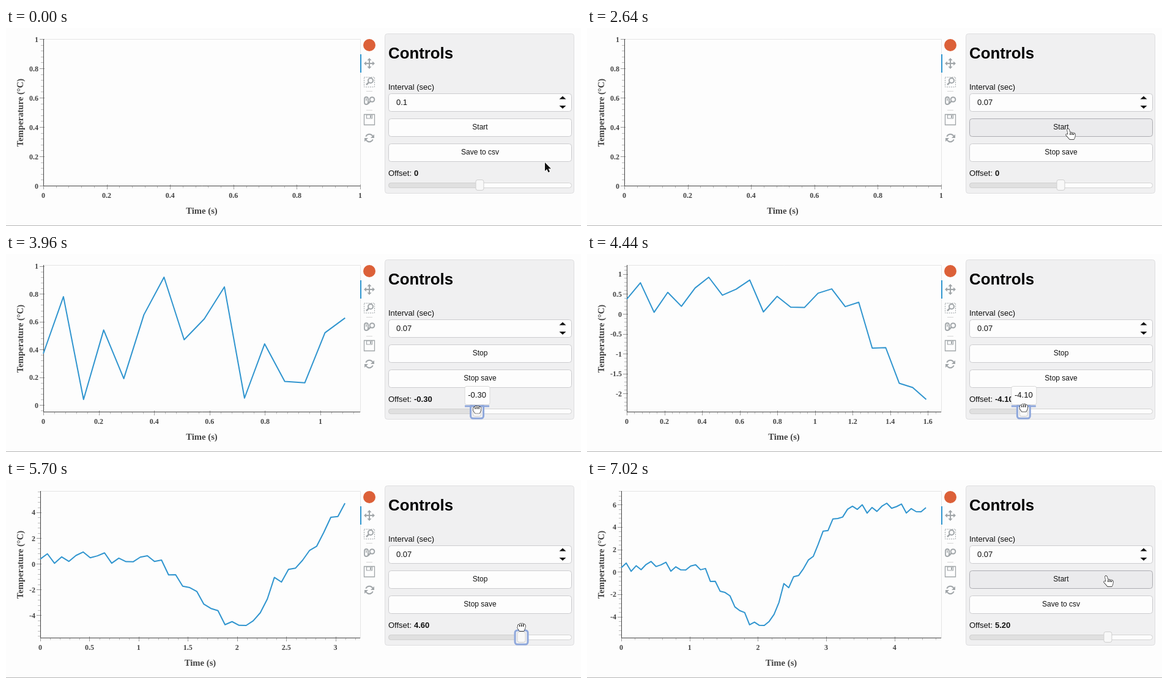
An HTML page with a canvas that plays this animation: 940x324 px, repeating every 7.05 s.

```html
<!DOCTYPE html>
<html>
<head>
<meta charset="utf-8">
<style>
html, body { margin: 0; width: 940px; height: 324px; overflow: hidden; background: #fdfdfd; }
canvas { display: block; }
</style>
</head>
<body>
<canvas id="stage" width="940" height="324"></canvas>
<script>
const c = document.getElementById('stage').getContext('2d');
const LOOP = 7050;
const SANS = '"Liberation Sans", Arial, sans-serif';
const SERIF = '"Liberation Serif", Times, serif';
const PAGE = '#fdfdfd', PANEL = '#f0f0f1', EDGE = '#cccccf', ICON = '#a1a6a9';
const INK = '#444', BLUE = '#3095cf', GLOW = '#8fa8dc';
const TOP = 18, BOTTOM = 258, RIGHT = 579;

// Moments of the interaction, in ms
const FIRST_STEP = 600, STEP_GAP = 240, SAVE = 1950, START = 3005;
const GRAB = 3600, DRAG = 3840, DROP = 6000, STOP = 6895;
const SAMPLE = 62.5, LAG = 70;

// [time, offset]
const offsetKeys = [
  [DRAG, 0], [4650, -4.95], [4820, -4.95], [5040, -1.5], [5200, -.5], [5700, 4.6], [5860, 5.2]
];
// [time, x, y]; while dragging, x follows the slider handle
const cursorKeys = [
  [150, 881, 220], [500, 909, 128], [1300, 909, 128], [1800, 797, 203], [2050, 797, 203],
  [2350, 786, 165], [3080, 786, 165], [3450, 774, 253], [3800, 774, 253],
  [5040, 752, 247], [5700, 843, 239], [DROP, 851, 240], [6350, 848, 157]
];

const smooth = x => x * x * (3 - 2 * x);
function track(keys, t, k) {
  const j = keys.findIndex(key => key[0] > t);
  if (j < 0) return keys[keys.length - 1][k];
  if (j === 0) return keys[0][k];
  const [a, b] = [keys[j - 1], keys[j]];
  return a[k] + (b[k] - a[k]) * smooth((t - a[0]) / (b[0] - a[0]));
}
const offsetAt = t => track(offsetKeys, t, 1);
const sliderX = v => 774.5 + 14.8 * v;

// The sensor: repeating noise lifted by the offset
const noise = [.37, .78, .04, .54, .19, .65, .92, .47, .62, .85, .05, .44, .17, .16, .52, .65];
const sampleTime = i => i * .0717 + .0135 * Math.min(1, i / 15);
const reading = i => noise[i % noise.length] + offsetAt(START + i * SAMPLE - LAG);

function text(s, x, y, font, color = '#111', align = 'left') {
  c.font = font;
  c.fillStyle = color;
  c.textAlign = align;
  c.fillText(s, x, y);
}
function paint(fill, stroke, width) {
  if (fill) { c.fillStyle = fill; c.fill(); }
  if (stroke) { c.strokeStyle = stroke; c.lineWidth = width; c.stroke(); }
}
function box(x, y, w, h, r, fill, stroke, width = 1) {
  c.beginPath();
  c.roundRect(x, y, w, h, r);
  paint(fill, stroke, width);
}
function line(points, color, width = 1) {
  c.beginPath();
  points.forEach(([x, y]) => c.lineTo(x, y));
  paint(null, color, width);
}
function poly(points, fill) {
  c.beginPath();
  points.forEach(([x, y]) => c.lineTo(x, y));
  paint(fill);
}
function ring(x, y, r, color, width, from = 0, to = 7) {
  c.beginPath();
  c.arc(x, y, r, from, to);
  paint(null, color, width);
}
function turned(x, y, angle, fn) {
  c.save();
  c.translate(x, y);
  c.rotate(angle);
  fn();
  c.restore();
}

// About six major steps of 1, 2 or 5, each with five minor ones
function ticks(lo, hi) {
  const span = hi - lo, base = 10 ** Math.floor(Math.log10(span / 6));
  const miss = s => Math.abs(6 - span / s);
  const step = [1, 2, 5, 10].map(m => m * base).reduce((a, b) => miss(b) < miss(a) ? b : a);
  const list = [], minor = step / 5;
  for (let k = Math.ceil(lo / minor - 1e-6); k <= hi / minor + 1e-6; k++)
    list.push({ v: k * minor, label: k % 5 ? '' : String(+(k * minor).toFixed(3)) });
  return list;
}

function chart(t) {
  const count = t < START ? 0 : Math.floor((Math.min(t, STOP) - START) / SAMPLE) + 1;
  const seen = Array.from({ length: count }, (_, i) => reading(i));
  let x1 = 1, y0 = 0, y1 = 1;
  if (count) {
    const lo = Math.min(...seen), hi = Math.max(...seen), pad = (hi - lo) * .1 || 1;
    x1 = sampleTime(count - 1) * 1.05 || 1;
    y0 = lo - pad;
    y1 = hi + pad;
  }
  const xt = ticks(0, x1), yt = ticks(y0, y1);
  const tickFont = 'bold 12px ' + SERIF, titleFont = 'bold 14.67px ' + SERIF;
  c.font = tickFont;
  const left = Math.round(46 + Math.max(...yt.map(k => c.measureText(k.label).width)));
  const px = v => left + v / x1 * (RIGHT - left);
  const py = v => BOTTOM - (v - y0) / (y1 - y0) * (BOTTOM - TOP);
  const snap = v => Math.round(v) + .5;
  const tickColor = label => label ? '#999' : '#bbb';

  box(left + .5, TOP + .5, RIGHT - left, BOTTOM - TOP, 0, null, '#e5e5e5');
  xt.forEach(({ v, label }) => {
    const x = snap(px(v));
    line([[x, BOTTOM - (label ? 2 : 0)], [x, BOTTOM + (label ? 6 : 4)]], tickColor(label));
    text(label, px(v), 278, tickFont, INK, 'center');
  });
  yt.forEach(({ v, label }) => {
    const y = snap(py(v));
    line([[left + (label ? 2 : 0), y], [left - (label ? 6 : 4), y]], tickColor(label));
    text(label, left - 8, py(v) + 4.5, tickFont, INK, 'right');
  });
  line([[left + .5, TOP], [left + .5, BOTTOM + .5], [RIGHT, BOTTOM + .5]], INK);
  c.lineJoin = 'round';
  line(seen.map((v, i) => [px(sampleTime(i)), py(v)]), BLUE, 2);
  c.lineJoin = 'miter';
  text('Time (s)', (left + RIGHT) / 2, 304, titleFont, INK, 'center');
  turned(28, 138.5, -Math.PI / 2, () => text('Temperature (°C)', 0, 0, titleFont, INK, 'center'));
}

function magnifier(x, y, r) {
  ring(x, y, r, ICON, 2);
  line([[x - r * .7, y + r * .7], [x - r - 3, y + r + 3]], ICON, 2.5);
}

function toolbar() {
  box(584, 18, 20, 20, 10, '#dc6038');
  box(579, 43, 2, 30, 0, BLUE);

  for (let k = 0; k < 4; k++)
    turned(594, 58, k * Math.PI / 2, () => {
      line([[0, 0], [7, 0]], ICON, 2);
      poly([[9, 0], [5, -3.5], [5, 3.5]], ICON);
    });

  c.setLineDash([2, 1.5]);
  box(585.5, 80.5, 17, 16, 0, null, ICON);
  c.setLineDash([]);
  magnifier(596, 86, 4);

  for (const y of [103.5, 134.5]) line([[589, y], [599, y]], '#d5d5d5');

  box(586, 113, 6, 12, 3, null, ICON, 1.8);
  line([[589, 115], [589, 119]], ICON, 1.5);
  magnifier(598.5, 117, 3.8);

  box(585.5, 141.5, 17, 17, 0, null, ICON, 1.3);
  box(589.5, 142, 9, 6, 0, null, ICON, 1.2);
  box(595, 143, 2, 4, 0, ICON);

  for (let k = 0; k < 2; k++)
    turned(594, 180, k * Math.PI, () => {
      ring(0, 0, 6.2, ICON, 2, .4, 2.75);
      poly([[8, -6], [8, 0], [2, 0]], ICON);
    });
}

function button(y, label, hover) {
  box(625.5, y + .5, 299, 29, 4, hover ? '#ebebed' : PAGE, hover ? '#adadb2' : EDGE);
  text(label, 775, y + 18, '12px ' + SANS, '#111', 'center');
}

function slider(t, v, hover) {
  const x = sliderX(v), active = t >= GRAB && t < STOP;
  const value = t < DRAG ? '0' : v.toFixed(2);
  text('Offset: ', 625, 242, '13px ' + SANS);
  text(value, 667, 242, 'bold 13px ' + SANS);
  box(625.5, 253.5, 299, 8, 4, PAGE, '#d3d3d3');
  box(625.5, 253.5, x - 625, 8, 4, '#e0e0e0', '#d0d0d0');
  if (active) box(x - 10.5, 246, 21, 23, 4, PANEL, GLOW, 3);
  box(x - 6.5, 248.5, 13, 17, 3, '#f8f8f8', '#cfcfcf');
  if (hover) {
    if (active) line([[x - 20, 249], [x + 20, 249]], GLOW, 3);
    box(x - 20, 216.5, 41, 30, 3, PAGE, '#d9d9d9');
    text(value, x, 235, '13px ' + SANS, '#111', 'center');
  }
}

function controls(t, v, over) {
  const running = t >= START && t < STOP;
  const focus = t >= FIRST_STEP && t < SAVE;
  const clicks = Math.max(0, Math.min(3, Math.floor((t - FIRST_STEP) / STEP_GAP) + 1));
  const sinceClick = t - FIRST_STEP - (clicks - 1) * STEP_GAP;
  box(619.5, 9.5, 309, 261, 4, PANEL, '#dedee0');
  text('Controls', 625, 50, 'bold 25.8px ' + SANS, '#000');
  text('Interval (sec)', 625, 101, '13px ' + SANS);
  box(625.5, 107.5, 299, 29, 4, PAGE, focus ? '#66afe0' : EDGE);
  text(String((10 - clicks) / 100), 638, 126, '13px ' + SANS);
  if (focus && sinceClick % 1000 < 500) line([[664.5, 114], [664.5, 129]], '#111');
  poly([[904.5, 116.5], [915.5, 116.5], [910, 111.5]], '#111');
  poly([[904.5, 127], [915.5, 127], [910, 132]], '#111');
  button(148, running ? 'Stop' : 'Start', over === 'start');
  button(189, t >= SAVE && t < STOP ? 'Stop save' : 'Save to csv', over === 'save');
  slider(t, v, over === 'handle');
}

const shapes = {
  arrow: 'M0 0V14L3.2 11L5.6 16.2L8 15L5.7 10.2H10Z',
  point: 'M-1 1Q0 -1 2 1L4 7Q5.5 5 7 7Q8.5 5.5 9.5 7.5Q12 6.5 12 10Q12 14 10 17H3L-3 10Q-2.5 7.5 0 9.5Z',
  fist: 'M-6 1Q-6 -3 -3.5 -2.5Q-2.5 -5 0 -3.5Q2 -5 3.5 -3Q6 -3.5 6.5 0Q6.5 4 4 8H-3L-6.5 3Z'
};
const knuckles = { point: 'M4 7V10M7 7V10M9.5 8V10', fist: 'M-3 -2V1M0 -3V1M3 -3V1' };
function cursor(kind, x, y) {
  const path = new Path2D(shapes[kind]), dark = kind === 'arrow';
  turned(x, y, 0, () => {
    c.lineJoin = 'round';
    c.lineWidth = dark ? 2 : 1.3;
    c.strokeStyle = dark ? '#fff' : '#111';
    c.fillStyle = dark ? '#111' : '#fff';
    c.stroke(path);
    c.fill(path);
    if (!dark) c.stroke(new Path2D(knuckles[kind]));
  });
}

function target(x, y, v) {
  if (x < 625 || x > 925) return '';
  if (y > 148 && y < 178) return 'start';
  if (y > 189 && y < 219) return 'save';
  if (x > 900 && y > 108 && y < 136) return 'spinner';
  if (y >= 249 && y < 267 && Math.abs(x - sliderX(v)) < 10) return 'handle';
  return '';
}

function draw(t) {
  const v = Math.round(offsetAt(t) * 10) / 10;
  const x = t > DRAG && t < DROP ? sliderX(v) : track(cursorKeys, t, 1);
  const y = track(cursorKeys, t, 2);
  const over = target(x, y, v);
  const held = t >= GRAB && t < DROP || over === 'handle';
  box(0, 0, 940, 324, 0, PAGE);
  chart(t);
  toolbar();
  controls(t, v, over);
  line([[0, 323.5], [940, 323.5]], '#b5b5b5');
  cursor(held ? 'fist' : over ? 'point' : 'arrow', x, y);
}

const begin = performance.now();
function frame() {
  draw((performance.now() - begin) % LOOP);
  requestAnimationFrame(frame);
}
frame();
</script>
</body>
</html>
```
